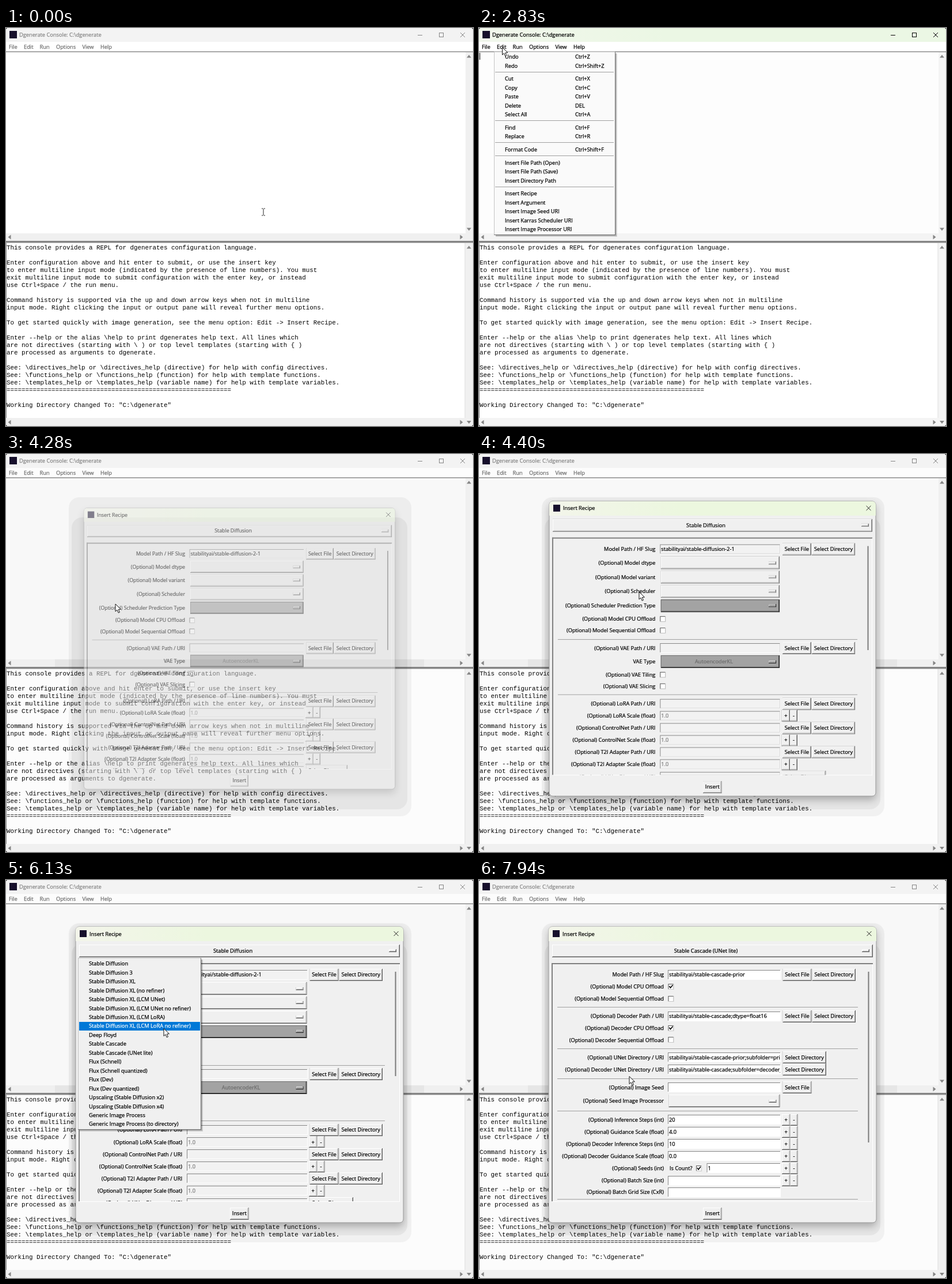
These frames come from a looping animation (811 by 690 pixels, 8000 ms). An HTML page with a canvas:

```html
<!DOCTYPE html>
<html lang="en">
<head>
<meta charset="utf-8">
<title>Console</title>
<style>
html, body { margin: 0; width: 811px; height: 690px; overflow: hidden; background: #222; }
canvas { display: block; }
</style>
</head>
<body>
<canvas id="stage" width="811" height="690"></canvas>
<script>
const LOOP = 8000, W = 811, H = 690;
const screen2d = document.getElementById('stage').getContext('2d');
const buffer = document.createElement('canvas');
buffer.width = W; buffer.height = H;
const buffer2d = buffer.getContext('2d');
let g = screen2d;

const UI = '9.25px "Open Sans", "Noto Sans", sans-serif';
const MONO = '10.832px "Liberation Mono", "Courier New", monospace';
const FACE = '#f0f0f0', DIM = '#a3a3a3', BLUE = '#0078d7', INK = '#000';

const CONSOLE = `This console provides a REPL for dgenerates configuration language.

Enter configuration above and hit enter to submit, or use the insert key
to enter multiline input mode (indicated by the presence of line numbers). You must
exit multiline input mode to submit configuration with the enter key, or instead
use Ctrl+Space / the run menu.

Command history is supported via the up and down arrow keys when not in multiline
input mode. Right clicking the input or output pane will reveal further menu options.

To get started quickly with image generation, see the menu option: Edit -> Insert Recipe.

Enter --help or the alias \\help to print dgenerates help text. All lines which
are not directives (starting with \\ ) or top level templates (starting with { )
are processed as arguments to dgenerate.

See: \\directives_help or \\directives_help (directive) for help with config directives.
See: \\functions_help or \\functions_help (function) for help with template functions.
See: \\templates_help or \\templates_help (variable name) for help with template variables.
${'='.repeat(60)}

Working Directory Changed To: "C:\\dgenerate"`.split('\n');

const EDIT = ['Undo|Ctrl+Z', 'Redo|Ctrl+Shift+Z', '', 'Cut|Ctrl+X', 'Copy|Ctrl+C', 'Paste|Ctrl+V',
  'Delete|DEL', 'Select All|Ctrl+A', '', 'Find|Ctrl+F', 'Replace|Ctrl+R', '', 'Format Code|Ctrl+Shift+F', '',
  'Insert File Path (Open)', 'Insert File Path (Save)', 'Insert Directory Path', '', 'Insert Recipe',
  'Insert Argument', 'Insert Image Seed URI', 'Insert Karras Scheduler URI', 'Insert Image Processor URI'];

const XL = 'Stable Diffusion XL';
const RECIPES = ['Stable Diffusion', 'Stable Diffusion 3', XL, XL + ' (no refiner)', XL + ' (LCM UNet)',
  XL + ' (LCM UNet no refiner)', XL + ' (LCM LoRA)', XL + ' (LCM LoRA no refiner)', 'Deep Floyd',
  'Stable Cascade', 'Stable Cascade (UNet lite)', 'Flux (Schnell)', 'Flux (Schnell quantized)', 'Flux (Dev)',
  'Flux (Dev quantized)', 'Upscaling (Stable Diffusion x2)', 'Upscaling (Stable Diffusion x4)',
  'Generic Image Process', 'Generic Image Process (to directory)'];

// Pointer stops: time, x, y
const PATH = [
  [0, 447, 319], [990, 439.5, 319], [1140, 385, 294], [1260, 272, 246], [1380, 173.5, 208],
  [1530, 150, 182], [1650, 118, 146], [1770, 88, 108], [1890, 64, 72], [2010, 48, 50.5],
  [2160, 44, 40], [2280, 41, 35], [2400, 40.5, 33.5],
  [3100, 46, 58], [3220, 57, 112], [3340, 68, 172], [3460, 78, 232], [3580, 87, 275],
  [3730, 90, 281], [3860, 91, 284], [4280, 190, 260], [4400, 278, 239],
  [4820, 308, 196], [4940, 343, 146], [5060, 361.5, 121.5], [5490, 355, 134], [5620, 347, 146],
  [5770, 334, 172], [5890, 314, 202], [6010, 294, 232], [6130, 274, 257.5], [6250, 262, 283],
  [6400, 253, 300], [6530, 250, 304], [7940, 261, 340.5]];

function rect(x, y, w, h, color) { g.fillStyle = color; g.fillRect(x, y, w, h); }

// A hairline outline gives the small type its firm weight
function text(s, x, mid, color = INK, align = 'left') {
  g.font = UI; g.textAlign = align;
  g.fillStyle = g.strokeStyle = color;
  g.lineWidth = 0.25;
  g.fillText(s, x, mid + 3.3);
  g.strokeText(s, x, mid + 3.3);
}

function line(points, color, width = 1) {
  g.strokeStyle = color; g.lineWidth = width;
  g.beginPath();
  points.forEach(([x, y], i) => i ? g.lineTo(x, y) : g.moveTo(x, y));
  g.stroke();
}

function clipTo(x, y, w, h, draw) {
  g.save(); g.beginPath(); g.rect(x, y, w, h); g.clip(); draw(); g.restore();
}

// Paints a group as one translucent sheet
function layer(alpha, draw) {
  buffer2d.clearRect(0, 0, W, H);
  g = buffer2d; draw(); g = screen2d;
  g.globalAlpha = alpha; g.drawImage(buffer, 0, 0); g.globalAlpha = 1;
}

function bevel(x, y, w, h, fill, light, dark) {
  rect(x, y, w, h, dark);
  rect(x, y, w - 1, h - 1, light);
  rect(x + 1, y + 1, w - 2, h - 2, fill);
}

function raised(x, y, w, h, fill = FACE) {
  const dim = fill == DIM;
  bevel(x, y, w, h, fill, dim ? '#707070' : '#fff', dim ? '#111' : '#5c5c5c');
  const inner = dim ? '#4a4a4a' : '#a8a8a8';
  rect(x + 1, y + h - 2, w - 2, 1, inner);
  rect(x + w - 2, y + 1, 1, h - 2, inner);
}

function button(label, x, mid, w, h = 21) {
  raised(x, Math.round(mid - h / 2), w, h);
  text(label, x + w / 2, mid, INK, 'center');
}

function entry(x, mid, w, value = '', fill = '#fff', color = INK) {
  bevel(x, Math.round(mid - 8.5), w, 17, fill, '#858585', '#fff');
  clipTo(x + 1, mid - 8, w - 2, 16, () => text(value, x + 2, mid, color));
}

function dropdown(x, mid, w, label = '', fill = FACE, color = INK) {
  raised(x, Math.round(mid - 11), w, 22, fill);
  if (fill == DIM) bevel(x + w - 19, Math.round(mid - 2.5), 13, 5, fill, '#e0e0e0', '#111');
  else raised(x + w - 19, Math.round(mid - 2.5), 13, 5);
  text(label, x + (w - 22) / 2, mid, color, 'center');
}

function check(x, mid, on) {
  bevel(x - 5, Math.round(mid - 5), 10, 10, '#fff', '#5c5c5c', '#c8c8c8');
  if (on) line([[x - 3, mid - 1], [x - 1, mid + 2], [x + 3, mid - 3]], INK, 1.6);
}

function triangle(x, y, angle) {
  g.save(); g.translate(x, y); g.rotate(angle);
  g.fillStyle = '#858585';
  g.beginPath(); g.moveTo(-4, 2.5); g.lineTo(4, 2.5); g.lineTo(0, -2.5); g.fill();
  g.restore();
}

function cross(x, y, color) {
  line([[x - 4, y - 4], [x + 4, y + 4]], color);
  line([[x + 4, y - 4], [x - 4, y + 4]], color);
}

function titleFill(x, w, from, to) {
  const f = g.createLinearGradient(x, 0, x + w, 0);
  f.addColorStop(0, from); f.addColorStop(0.4, to); f.addColorStop(1, to);
  return f;
}

function mainWindow(active, behind, caret) {
  const ink = active ? INK : '#858585', menuInk = active ? INK : '#6d6d6d';
  const bars = active ? '#f4f4f4' : FACE;
  const paper = active ? '#fdfdfd' : behind ? '#f8f8f8' : '#fff';
  rect(0, 0, W, H, behind ? '#fcfcfc' : '#fff');
  rect(0, 0, W, 24, active ? titleFill(0, W, '#f1f7ec', '#ebf7e4') : '#f3f3f3');
  rect(6, 5, 13, 13, '#17102c');
  text('Dgenerate Console: C:\\dgenerate', 23, 12, ink);
  line([[715, 12.5], [723, 12.5]], ink);
  g.strokeRect(752.5, 8.5, 7, 7);
  cross(793, 12, ink);
  [['File', 5], ['Edit', 31], ['Run', 58.5], ['Options', 87], ['View', 132.5], ['Help', 164]]
    .forEach(([s, x]) => text(s, x, 32.5, menuInk));

  rect(0, 42, 798, 314, paper);
  rect(0, 40.5, W, 1.5, '#8c8c8c');
  rect(798, 42, 13, 314, bars);
  rect(0, 356, W, 13, bars);
  rect(0, 369, W, 3.5, '#858585');
  rect(797, 373, 14, 317, bars);
  rect(0, 676, W, 14, bars);
  rect(0, 373, 1, 303, '#8c8c8c');
  rect(796.5, 373, 1, 303, '#dedede');
  [[804, 49, 0], [804, 349, 2], [6, 362.5, 3], [791, 362.5, 1],
   [804, 380, 0], [804, 683.5, 2], [6, 683.5, 3], [791, 683.5, 1]]
    .forEach(([x, y, turn]) => triangle(x, y, turn * Math.PI / 2));

  g.font = MONO; g.fillStyle = INK; g.textAlign = 'left';
  CONSOLE.forEach((s, i) => g.fillText(s, 1, 384 + i * 13));
  if (caret) rect(1, 43, 1, 12, INK);
}

function menu(x, y, w, h, items, first, pointer, fill = FACE) {
  for (let i = 3; i > 0; i--) rect(x + 3, y + 3, w - 3 + i, h - 3 + i, 'rgba(0,0,0,.12)');
  bevel(x, y, w, h, fill, '#c4c4c4', '#747474');
  let mid = first;
  items.forEach(item => {
    if (!item) {
      rect(x + 2, Math.round(mid - 5.2), w - 5, 1, '#a0a0a0');
      mid += 7.25;
      return;
    }
    const [label, keys] = item.split('|');
    const hot = pointer && pointer.x < x + w && pointer.y >= mid - 7.7 && pointer.y < mid + 7.75;
    if (hot) rect(x + 2, Math.ceil(mid - 7.7), w - 4, 15, BLUE);
    const ink = hot ? '#fff' : INK;
    text(label, x + 19, mid, ink);
    if (keys) text(keys, x + 141, mid, ink);
    mid += 15.45;
  });
}

const files = y => button('Select File', 527.5, y, 50);
const folders = (y, x = 578.5) => button('Select Directory', x, y, 75.5);
const rule = y => rect(136, Math.round(y), 522, 1, '#a0a0a0');
function spin(y) { button('+', 526, y, 14.5, 20); button('-', 540.5, y, 13, 20); }

function diffusionForm() {
  const label = (s, y) => text(s, 306, y, INK, 'right');
  const opt = (s, y) => label('(Optional) ' + s, y);
  const field = (y, s, c) => entry(314, y, 210, s, '#f2f2f2', c);
  const box = (y, s, fill) => dropdown(315.5, y, 207, s, fill, '#6d6d6d');
  label('Model Path / HF Slug', 164);
  field(164, 'stabilityai/stable-diffusion-2-1'); files(164); folders(164);
  ['Model dtype', 'Model variant', 'Scheduler', 'Scheduler Prediction Type'].forEach((s, i) => {
    const y = 188 + i * 24.9;
    opt(s, y); box(y, '', i == 3 ? DIM : FACE);
  });
  [['Model CPU Offload', 285.5], ['Model Sequential Offload', 306], ['VAE Tiling', 382.5], ['VAE Slicing', 403]]
    .forEach(([s, y]) => { opt(s, y); check(319, y); });
  rule(320.5);
  opt('VAE Path / URI', 336.5); field(336.5); files(336.5); folders(336.5);
  label('VAE Type', 360); box(360, 'AutoencoderKL', DIM);
  rule(417);
  ['LoRA', 'ControlNet', 'T2I Adapter'].forEach((s, i) => {
    const y = 433 + i * 42.3;
    opt(s + ' Path / URI', y); field(y); files(y); folders(y);
    opt(s + ' Scale (float)', y + 21.3); field(y + 21.3, '1.0', '#808080'); spin(y + 21.3);
  });
  opt('UNet Directory / URI', 560); field(560); folders(560, 527.5);
}

function cascadeForm() {
  const label = (s, y) => text(s, 321, y, INK, 'right');
  const opt = (s, y) => label('(Optional) ' + s, y);
  const field = (y, s) => entry(328, y, 196, s);
  label('Model Path / HF Slug', 164);
  field(164, 'stabilityai/stable-cascade-prior'); files(164); folders(164);
  opt('Decoder Path / URI', 236);
  field(236, 'stabilityai/stable-cascade;dtype=float16'); files(236); folders(236);
  [['Model', 185], ['Decoder', 256.7]].forEach(([s, y]) => {
    opt(s + ' CPU Offload', y); check(333.5, y, true);
    opt(s + ' Sequential Offload', y + 20.5); check(333.5, y + 20.5);
  });
  [219.5, 291.5, 343.5, 400, 552.5].forEach(rule);
  opt('UNet Directory / URI', 307.5);
  field(307.5, 'stabilityai/stable-cascade-prior;subfolder=prior_lite'); folders(307.5, 527.5);
  opt('Decoder UNet Directory / URI', 328.5);
  field(328.5, 'stabilityai/stable-cascade;subfolder=decoder_lite'); folders(328.5, 527.5);
  opt('Image Seed', 359.5); field(359.5); files(359.5);
  opt('Seed Image Processor', 383); dropdown(329.5, 383, 193);
  [['Inference Steps (int)', '20'], ['Guidance Scale (float)', '4.0'], ['Decoder Inference Steps (int)', '10'],
   ['Decoder Guidance Scale (float)', '0.0'], ['Seeds (int)'], ['Batch Size (int)', '']].forEach(([s, v], i) => {
    const y = 415.5 + i * 21.1;
    opt(s, y); spin(y);
    if (v !== undefined) return field(y, v);
    text('Is Count?', 331, y);
    check(382, y, true);
    entry(395.5, y, 128.5, '1');
  });
  opt('Batch Grid Size (CxR)', 541); field(541);
}

function shadow() {
  g.fillStyle = 'rgba(0,0,0,.045)';
  g.beginPath(); g.roundRect(109, 75, 595, 553, 18); g.fill();
  g.fillRect(85, 356, 641, 13);
  g.fillStyle = 'rgba(0,0,0,.05)';
  g.beginPath(); g.roundRect(114, 110, 583, 506, 18); g.fill();
}

function dialog(scale, cascade) {
  g.save();
  g.translate(405.5, 337); g.scale(scale, scale); g.translate(-405.5, -337);
  g.beginPath(); g.roundRect(121, 81, 569, 513, 6);
  g.save();
  g.shadowColor = 'rgba(0,0,0,.28)'; g.shadowBlur = 14; g.shadowOffsetY = 6;
  g.fillStyle = FACE; g.fill();
  g.restore();
  g.strokeStyle = '#9a9a9a'; g.lineWidth = 1; g.stroke();
  g.save(); g.clip();
  rect(121, 81, 569, 25, titleFill(121, 569, '#f3f5ea', '#ecf7df'));
  g.restore();
  rect(128, 87, 12, 12, '#17102c');
  text('Insert Recipe', 145, 93.3);
  cross(677.5, 93, '#222');
  dropdown(127, 122.5, 557);
  text(cascade ? RECIPES[10] : RECIPES[0], 394, 122.5, INK, 'center');
  rect(126, 144, 558, 2, '#808080');
  rect(126, 144, 2, 413, '#808080');
  rect(683, 146, 1, 412, '#fff');
  rect(128, 557, 556, 1, '#fff');
  clipTo(128, 146, 555, 411, cascade ? cascadeForm : diffusionForm);
  rect(675.5, 159, 2, cascade ? 296 : 181, '#7a7a7a');
  button('Insert', 389, 578, 32.5);
  g.restore();
}

function arrow(x, y) {
  const shape = [[0, 0], [0, 13], [3, 10.3], [5.2, 15.3], [7.4, 14.3], [5.3, 9.5], [9.4, 9.2]];
  g.beginPath();
  shape.forEach(([a, b]) => g.lineTo(x + a, y + b));
  g.closePath();
  g.fillStyle = '#fff'; g.fill();
  g.strokeStyle = '#111'; g.lineWidth = 1; g.stroke();
}

function ibeam(x, y) {
  const c = '#222';
  line([[x, y - 5.5], [x, y + 5.5]], c);
  [-6, 6].forEach(d => {
    line([[x - 3, y + d], [x - 0.7, y + d]], c);
    line([[x + 0.7, y + d], [x + 3, y + d]], c);
  });
}

function draw(t) {
  const [, x, y] = PATH.filter(p => p[0] <= t).pop();
  const pointer = { x, y };
  const active = t >= 2830 && t < 4280;
  const caret = active && !(t >= 3100 && t < 3580);
  g.clearRect(0, 0, W, H);
  g.save();
  g.beginPath(); g.roundRect(0, 0, W, H, 4); g.clip();
  mainWindow(active, t >= 4280, caret);
  if (t >= 2830 && t < 4130)
    menu(26, 41, 211, 318, EDIT, 50, t >= 3100 && pointer, t < 2960 ? '#fafafa' : FACE);
  if (t >= 4280) {
    shadow();
    const scale = t < 4400 ? 0.95 : t < 4550 ? 0.9965 : 1;
    if (t < 4400) layer(0.5, () => dialog(scale, false));
    else dialog(scale, t >= 7390);
  }
  if (t >= 5060 && t < 7240)
    layer(t < 5210 ? 0.68 : 1, () => menu(125, 135, 214, 298, RECIPES, 145, t >= 5770 && pointer));
  if (t < 2160) ibeam(x, y); else arrow(x, y);
  g.restore();
}

const start = performance.now();
function tick() {
  draw((performance.now() - start) % LOOP);
  requestAnimationFrame(tick);
}
tick();
</script>
</body>
</html>
```
